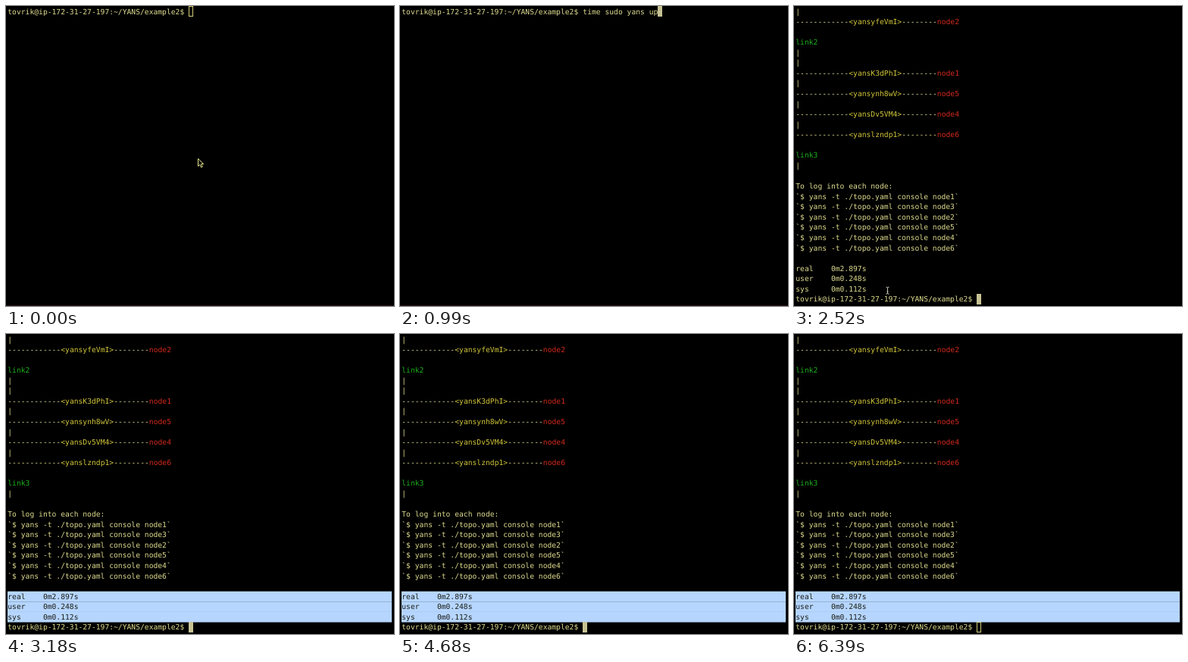
An HTML page for the animation above (6.42 s loop, 512x396 px).

```html
<!DOCTYPE html>
<html lang="en">
<head>
<meta charset="utf-8">
<title>Terminal session</title>
<style>
html, body { margin: 0; width: 100%; height: 100%; overflow: hidden; background: #000; }
svg { display: block; width: 512px; height: 396px; background: #000; }
text {
  font: 9.684px "DejaVu Sans Mono", monospace;
  white-space: pre;
  text-rendering: geometricPrecision;
  fill: #dedb8e;
}
.name { fill: #d2c63a; }
.node { fill: #d32a1c; }
.link { fill: #1cb01c; }
.picked { fill: #1a1c14; }
</style>
</head>
<body>
<svg id="stage" viewBox="0 0 512 396" xmlns="http://www.w3.org/2000/svg">
  <rect id="edge" y="395" width="512" height="1" fill="#28141a"/>
  <g id="selection"></g>
  <rect id="cursor"/>
  <g id="shell"><text id="command"></text></g>
  <g id="output"></g>
  <path id="arrow" d="M253.5 201.5v10l2.3-2.2 1.7 3.7 1.7-.8-1.6-3.6h3.1z"
    fill="#000" stroke="#e6e48c" stroke-width="1"/>
  <path id="beam" d="M-2-4.5Q0-4.5 0-3.3Q0-4.5 2-4.5M0-3.3V3.6M-2 4.7Q0 4.7 0 3.6Q0 4.7 2 4.7M-1 1.5H1"
    fill="none" stroke="#d8d8c4" stroke-width=".9"/>
</svg>
<script>
const LOOP = 6420, STEP = 30;
const COL = 5.83, ROW = 13.57, LEFT = 2.3, BASE = 10.5;
const TYPE_AT = 330, TYPE_END = 990, RUN_AT = 1080, DONE_AT = 1830;
const PROMPT = "tovrik@ip-172-31-27-197:~/YANS/example2$ ";
const COMMAND = "time sudo yans up";
const $ = id => document.getElementById(id);

function add(parent, tag, attrs, content) {
  const el = document.createElementNS("http://www.w3.org/2000/svg", tag);
  for (const key in attrs) el.setAttribute(key, attrs[key]);
  if (content) el.textContent = content;
  return parent.appendChild(el);
}

function place(el, col, row) {
  el.setAttribute("x", LEFT + col * COL);
  el.setAttribute("y", BASE + row * ROW);
}

function write(parent, row, content, style = "", col = 0) {
  const el = add(parent, "text", { class: style }, content);
  place(el, col, row);
  return el;
}

const show = (id, on) => $(id).setAttribute("visibility", on ? "visible" : "hidden");

function buildOutput() {
  const out = $("output");
  const put = (...args) => write(out, ...args);
  const branch = (row, name, node) => {
    put(row, "-".repeat(12));
    put(row, `<yans${name}>`, "name", 12);
    put(row, "-".repeat(8), "", 24);
    put(row, "node" + node, "node", 32);
  };
  [0, 4, 5, 7, 9, 11, 15].forEach(row => put(row, "|"));
  branch(1, "yfeVmI", 2);
  put(3, "link2", "link");
  branch(6, "K3dPhI", 1);
  branch(8, "ynh8wV", 5);
  branch(10, "Dv5VM4", 4);
  branch(12, "lzndp1", 6);
  put(14, "link3", "link");
  put(17, "To log into each node:");
  [1, 3, 2, 5, 4, 6].forEach((n, i) =>
    put(18 + i, "`$ yans -t ./topo.yaml console node" + n + "`"));
  put(28, PROMPT);
  return ["real    0m2.897s", "user    0m0.248s", "sys     0m0.112s"].map((s, i) => ({
    text: put(25 + i, s),
    bar: add($("selection"), "rect",
      { x: 2, y: 339.7 + i * ROW, width: 507, height: ROW + 0.1, fill: "#b6d6ff" })
  }));
}

const timings = buildOutput();
write($("shell"), 0, PROMPT);
place($("command"), PROMPT.length, 0);

function setCursor(col, row, hollow) {
  const inset = hollow ? 0.5 : 0;
  const attrs = {
    x: Math.round(LEFT + col * COL - 0.5) + inset,
    y: Math.round(row * ROW) + inset,
    width: 6 - 2 * inset,
    height: 14 - 2 * inset,
    fill: hollow ? "none" : "#c6c294",
    stroke: hollow ? "#d2ce78" : "none"
  };
  for (const key in attrs) $("cursor").setAttribute(key, attrs[key]);
}

// Pointer path: time, x, y
const PATH = [[1980, 355, 300], [2520, 123.5, 375.5], [2700, 4, 347], [2790, 4, 347], [3000, 4, 387]];

function pointer(t) {
  const i = PATH.findIndex(p => p[0] > t);
  if (i < 1) return null;
  const [t0, x0, y0] = PATH[i - 1], [t1, x1, y1] = PATH[i];
  const k = (t - t0) / (t1 - t0), e = k * k * (3 - 2 * k);
  return [x0 + (x1 - x0) * e, y0 + (y1 - y0) * e];
}

function draw(time) {
  const t = Math.floor((time % LOOP) / STEP) * STEP;
  const done = t >= DONE_AT;
  const hollow = t < 30 || t >= 6390;
  const pace = (TYPE_END - TYPE_AT) / (COMMAND.length - 1);
  const typed = t < TYPE_AT ? 0 : Math.min(COMMAND.length, 1 + Math.floor((t - TYPE_AT) / pace));

  $("command").textContent = COMMAND.slice(0, typed);
  show("shell", !done);
  show("output", done);
  show("edge", !done);
  show("arrow", t < 30);

  if (done) setCursor(PROMPT.length, 28, hollow);
  else if (t >= RUN_AT) setCursor(0, 1, false);
  else setCursor(PROMPT.length + typed, 0, hollow);

  const spot = pointer(t);
  show("beam", !!spot);
  if (spot) $("beam").setAttribute("transform", `translate(${spot[0]} ${spot[1]})`);

  timings.forEach(({ text, bar }, i) => {
    const picked = t >= 2850 + i * 60;
    text.setAttribute("class", picked ? "picked" : "");
    bar.setAttribute("visibility", picked ? "visible" : "hidden");
  });
}

const start = performance.now();
function tick() {
  draw(performance.now() - start);
  requestAnimationFrame(tick);
}
draw(0);
requestAnimationFrame(tick);
</script>
</body>
</html>
```
